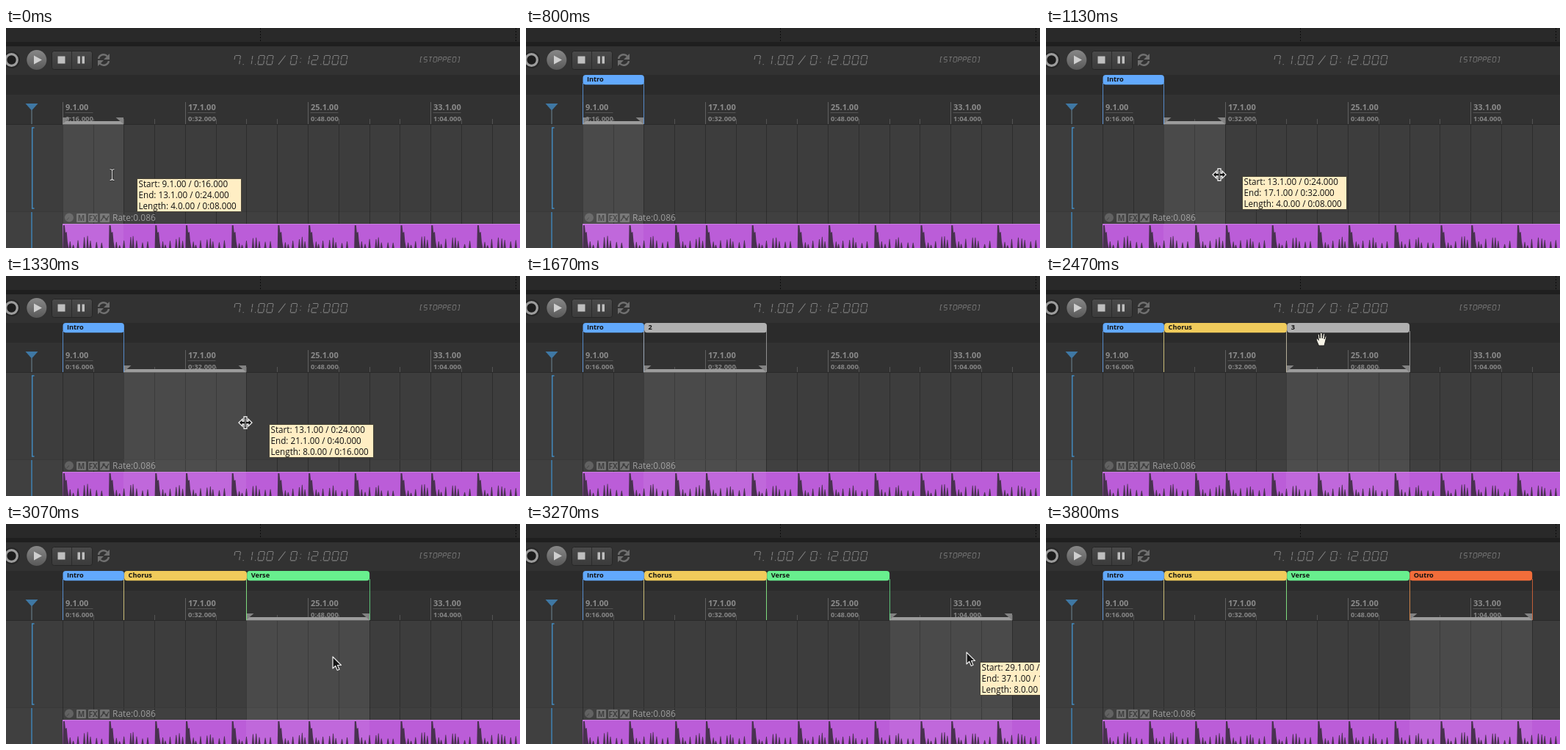
These frames come from a looping animation (700x300 px, 3870 ms). An HTML page:

```html
<!DOCTYPE html>
<html lang="en">
<head>
<meta charset="utf-8">
<title>Timeline regions</title>
<style>
  html, body { margin: 0; width: 100%; height: 100%; overflow: hidden; background: #3d3d3d; }
  svg { display: block; width: 700px; height: 300px; }
  text { font-family: "Open Sans", "Noto Sans", sans-serif; }
  .bar { font-size: 11px; font-weight: 700; fill: #8b8b8b; }
  .time { font-size: 9.5px; font-weight: 700; fill: #868686; }
  .name { font-size: 9.2px; font-weight: 700; fill: #111; }
  .tip { font-size: 11.7px; font-weight: 500; fill: #111; }
  .icon { font-size: 10px; font-weight: 700; fill: #3d3d3d; text-anchor: middle; }
</style>
</head>
<body>
<svg viewBox="0 0 700 300">
  <defs>
    <linearGradient id="knob" x2="0" y2="1">
      <stop stop-color="#888"/><stop offset="1" stop-color="#595959"/>
    </linearGradient>
    <linearGradient id="key" x2="0" y2="1">
      <stop stop-color="#4a4a4a"/><stop offset="1" stop-color="#3b3b3b"/>
    </linearGradient>
  </defs>
  <g id="base"></g>
  <g id="live"></g>
  <g id="front"></g>
</svg>
<script>
const LOOP = 3870;
const [base, live, front] = ['base', 'live', 'front'].map(id => document.getElementById(id));

const rect = (x, y, w, h, fill, more = '') =>
  `<rect x="${x}" y="${y}" width="${w}" height="${h}" fill="${fill}" ${more}/>`;
const path = (d, fill, more = '') => `<path d="${d}" fill="${fill}" ${more}/>`;
const line = (d, color, width = 1, more = '') =>
  path(d, 'none', `stroke="${color}" stroke-width="${width}" ${more}`);
const text = (x, y, cls, s) => `<text x="${x}" y="${y}" class="${cls}">${s}</text>`;

const barX = bar => 77.3 + (bar - 9) * 20.89;
const crisp = x => Math.floor(x) + 0.5;
const clock = s => `${Math.floor(s / 60)}:${String(s % 60).padStart(2, '0')}.000`;

// Slanted segment display: a top, b/c right, d bottom, e/f left, g middle
const SEGMENTS = {
  a: 'M1 0H8', b: 'M8.5 .6V5.9', c: 'M8.5 7.1V12.4', d: 'M1 13H8',
  e: 'M.5 7.1V12.4', f: 'M.5 .6V5.9', g: 'M1 6.5H8',
  t: 'M4.5 .6V12.4', s: 'M0 13L8 0', p: 'M2 12.2V13.4', q: 'M2 3.3V4.5M2 9V10.2',
  l: 'M7 0H4V13H7', r: 'M2 0H5V13H2'
};
const GLYPHS = {
  0: 'abcdef', 1: 'bc', 2: 'abged', 7: 'fabc', S: 'afgcd', T: 'at', O: 'abcdef', P: 'abefg',
  E: 'adefg', D: 'abcdef', '/': 's', '.': 'p', ':': 'q', '[': 'l', ']': 'r', ' ': ''
};
const ADVANCE = { '.': 5, ':': 5.4, ' ': 5.5, '/': 11 };

function segments(str, x, y, scale, color, width) {
  let pen = 0, out = '';
  for (const ch of str) {
    const d = [...GLYPHS[ch]].map(k => SEGMENTS[k]).join('');
    if (d) out += `<path transform="translate(${pen})skewX(-9)" d="${d}"/>`;
    pen += ADVANCE[ch] || 12.3;
  }
  return `<g role="img" aria-label="${str}" transform="translate(${x} ${y})scale(${scale})"
    fill="none" stroke="${color}" stroke-width="${width}">${out}</g>`;
}

function toolbar() {
  const arrows = 'M126 42A7 7 0 0 1 138 38.5M140 45A7 7 0 0 1 128 48.5';
  return rect(0, 0, 700, 20, '#292929') +
    line('M346.5 0V20M694.5 0V20', '#0d0d0d', 1, 'stroke-dasharray="2 2"') +
    rect(0, 19, 700, 6, '#1f1f1f') +
    rect(0, 25, 700, 39, '#323232') +
    '<circle cx="7.5" cy="43.5" r="11.5" fill="#262626"/>' +
    '<circle cx="7.5" cy="43.5" r="7.8" fill="#1c1c1c" stroke="#9c9c9c" stroke-width="3.2"/>' +
    '<circle cx="41.8" cy="43.5" r="13.5" fill="url(#knob)"/>' +
    path('M38 37.5L49 43.5L38 49.5Z', '#cfcfcf') +
    rect(62.5, 31.5, 55, 25, 'url(#key)', 'rx="3" stroke="#262626"') +
    line('M89.5 32V56', '#2b2b2b') +
    rect(70.5, 38.5, 10, 10, '#bfbfbf') +
    rect(97.5, 38.5, 3.5, 10, '#bfbfbf') + rect(103.5, 38.5, 3.5, 10, '#bfbfbf') +
    line(arrows, '#707070', 2.5) +
    path('M141 35V43H133ZM125 52V44H133Z', '#707070') +
    segments('7.1.00 / 0:12.000', 311.5, 37.5, 0.95, '#808080', 1.15) +
    segments('[STOPPED]', 563, 39.5, 0.53, '#787878', 1.8);
}

function ruler() {
  let out = rect(0, 64, 700, 27, '#2b2b2b') + rect(0, 91, 700, 41, '#323232') +
    rect(0, 131, 700, 1, '#2a2a2a') + rect(0, 132, 700, 168, '#3d3d3d') +
    rect(0, 251, 700, 49, '#404040');
  for (let bar = 9; bar < 39; bar += 2) {
    const x = crisp(barX(bar)), major = bar % 8 === 1;
    out += line(`M${x} 132V267`, '#2d2d2d') +
      line(`M${x} ${major ? 101 : 124}V131`, major ? '#606060' : '#545454');
    if (!major) continue;
    out += text(x + 3.5, 112.2, 'bar', `${bar}.1.00`) +
      line(`M${x + 3} 115.5h38`, '#555') +
      text(x + 3.5, 126.8, 'time', clock((bar - 1) * 2));
  }
  return out + line('M0 250.5H700', '#353535', 1, 'stroke-dasharray="1 1"');
}

function playhead() {
  return line('M35 112V131', '#6f8796') + line('M35 251V300', '#3f7eac', 1.6) +
    path('M26.5 103H43.5L35 112.5Z', '#3f78a4') +
    line('M38.5 136H35.7V246H38.5', '#4389bd', 1.5);
}

function waveform() {
  let seed = 7;
  const rnd = () => (seed = seed * 16807 % 2147483647) / 2147483647;
  const needle = (x, h) =>
    `M${x - 1.6} 300L${x - .4} ${300 - h}H${x + .4}L${x + 1.6} 300Z`;
  const tail = [[10, 8], [14, 5], [20, 11], [29, 14], [33, 17], [37, 10]];
  let wave = '';
  for (let beat = 0; beat < 12; beat++) {
    const x = barX(9 + 8 * Math.floor(beat / 3) + 3 * (beat % 3));
    wave += `M${x} 300L${x + .6} 269H${x + 2.6}L${x + 3.6} 279L${x + 5.4} 278L${x + 6.5} 291L${x + 8} 300Z`;
    for (const [dx, h] of tail) wave += needle(x + dx + rnd(), h * (.75 + rnd() * .4));
    if (beat % 3 < 2) wave += needle(x + 46, 5 + rnd() * 4) + needle(x + 53, 6 + rnd() * 5);
  }
  return path(wave, '#48324f');
}

function clip() {
  return rect(77, 267, 623, 33, '#bb5dd8') + rect(77, 267, 623, 1, '#cb7de3');
}

function clipHeader() {
  return '<circle cx="86" cy="258.5" r="6" fill="#626262"/>' +
    line('M86 258.5L82.500 262', '#505050', 1.2) +
    [96, 112, 128].map(x => rect(x, 253, 13, 12, '#717171', 'rx="1"')).join('') +
    text(102.5, 262.7, 'icon', 'M') + text(118.5, 262.7, 'icon', 'FX') +
    line('M129 263L133 257.5L137 261L140 256', '#3d3d3d', 1.3) +
    path('M131.5 255.5h3v3h-3zM135.5 259.5h3v3h-3z', '#3d3d3d') +
    '<text x="145" y="263" font-size="12" fill="#9c9c9c">Rate:0.086</text>';
}

const BEAM = 'M-3 -7.5Q0 -7.5 0 -5.5V5.5Q0 7.5 -3 7.5M3 -7.5Q0 -7.5 0 -5.5M0 5.5Q0 7.5 3 7.5';
const CURSORS = {
  beam: line(BEAM, '#222', 2.6) + line(BEAM, '#ddd', 1.1),
  size: path('M-9 0L-4 -5V-2H-2V-8H2V-2H4V-5L9 0L4 5V2H2V8H-2V2H-4V5Z', '#111',
    'stroke="#f2f2f2" stroke-width="1.3"') + line('M0 -6V6', '#eee', .8),
  arrow: path('M0 0V16L3.7 12.5L6.3 18.5L9 17.3L6.5 11.5H11.5Z', '#151515',
    'stroke="#e8e8e8" stroke-width="1.2" stroke-linejoin="round"'),
  hand: path('M-3.5 9L-6.5 2Q-7.5 -1 -5.5 -1L-3.8 1.5L-4.8 -6Q-4 -8 -2.7 -6L-1.8 -1L-1.5 -8Q0 -10 1 -8L1.2 -1L2.5 -7Q4 -8.5 4.5 -6.5L4 0L5.5 -4Q7 -5 7 -3L5 5L4 9Z',
    '#f6f3e6', 'stroke="#222" stroke-width="1" stroke-linejoin="round"')
};

// time, selection start and end bar, cursor, x, y, tooltip x, y
const STEPS = [
  [0, 9, 13, 'beam', 144.5, 200, 178, 205],
  [70, 9, 13, 'beam', 147, 203, 181, 209],
  [130, 9, 13, 'beam', 147, 196],
  [200, 9, 13, 'arrow', 150, 140],
  [270, 9, 13, 'hand', 152, 95],
  [330, 9, 13, 'hand', 153.5, 77.5],
  [530, 9, 13],
  [930, 9, 13, 'arrow', 163, 175],
  [1000, 13, 13, 'beam', 163, 200],
  [1070, 13, 15, 'size', 196, 200, 222, 202],
  [1130, 13, 17, 'size', 236, 200, 267, 202],
  [1200, 13, 19, 'size', 282, 200, 305, 202],
  [1270, 13, 21, 'size', 318, 200, 346, 202],
  [1330, 13, 21, 'size', 326, 200, 358, 202],
  [1400, 13, 21, 'size', 326, 200],
  [1470, 13, 21, 'arrow', 300, 140],
  [1530, 13, 21, 'hand', 262, 92],
  [1600, 13, 21, 'hand', 250, 76],
  [1670, 13, 21],
  [2070, 13, 21, 'arrow', 270, 182],
  [2130, 13, 21, 'arrow', 300, 180, 302, 188],
  [2200, 15, 23, 'arrow', 350, 178, 330, 188],
  [2270, 19, 27, 'arrow', 408, 180, 385, 188],
  [2330, 21, 29, 'arrow', 432, 180, 461, 188],
  [2400, 21, 29, 'arrow', 412, 130],
  [2470, 21, 29, 'hand', 375, 86],
  [2530, 21, 29, 'hand', 377.5, 75],
  [2670, 21, 29],
  [2930, 21, 29, 'arrow', 415, 150],
  [3000, 21, 29, 'arrow', 438, 176],
  [3070, 21, 29, 'arrow', 445, 181],
  [3130, 23, 31, 'arrow', 490, 181, 480, 188],
  [3200, 27, 35, 'arrow', 565, 180, 550, 188],
  [3270, 29, 37, 'arrow', 600, 175, 618, 188],
  [3330, 29, 37, 'hand', 585, 92],
  [3400, 29, 37, 'hand', 618, 78],
  [3470, 29, 37, 'hand', 650, 68],
  [3530, 29, 37, 'hand', 657, 65],
  [3670, 29, 37]
];

// time added, time named, start and end bar, name, colour
const REGIONS = [
  [270, 670, 9, 13, 'Intro', '#62a9fd'],
  [1530, 1930, 13, 21, 'Chorus', '#f0cb5b'],
  [2470, 2870, 21, 29, 'Verse', '#68ef8e'],
  [3330, 3800, 29, 37, 'Outro', '#f26d3a']
];

function selection(from, to) {
  if (from === to) return '';
  const a = Math.floor(barX(from)), b = Math.floor(barX(to));
  return rect(a, 132, b - a, 168, '#fff', 'opacity=".065"') +
    rect(a, 127, b - a, 4.5, '#9c9c9c') +
    path(`M${a} 122H${a + 10.5}L${a} 131ZM${b} 122H${b - 10.5}L${b} 131Z`, '#828282');
}

function region([added, named, from, to, name, fill], i, t) {
  if (t < added) return '';
  const done = t >= named, a = barX(from), b = barX(to), color = done ? fill : '#b0b0b0';
  return line(`M${crisp(a)} 75V131M${crisp(b)} 75V131`, color, 1, 'opacity=".75"') +
    rect(a + .2, 64, b - a - .2, 13.2, color, 'rx="4"') +
    text(a + 5.7, 73.4, 'name', done ? name : i + 1);
}

function tooltip(x, y, from, to) {
  const n = to - from;
  const rows = [
    `Start: ${from}.1.00 / ${clock((from - 1) * 2)}`,
    `End: ${to}.1.00 / ${clock((to - 1) * 2)}`,
    `Length: ${n}.0.00 / ${clock(n * 2)}`
  ];
  return rect(x + .5, y + .5, 142, 45, '#ffeec4', 'stroke="#4a4538"') +
    rows.map((s, i) => text(x + 2.5, y + 11.7 + 15 * i, 'tip', s)).join('');
}

function render(t) {
  const [, from, to, cursor, x, y, tipX, tipY] = STEPS.findLast(s => s[0] <= t);
  let out = selection(from, to) + REGIONS.map((r, i) => region(r, i, t)).join('');
  if (tipX) out += tooltip(tipX, tipY, from, to);
  if (cursor) out += `<g transform="translate(${x} ${y})">${CURSORS[cursor]}</g>`;
  return out;
}

base.innerHTML = toolbar() + ruler() + clip() + clipHeader() + playhead();
front.innerHTML = waveform();

const start = performance.now();
let shown = '';
function tick() {
  const next = render((performance.now() - start) % LOOP);
  if (next !== shown) live.innerHTML = shown = next;
  requestAnimationFrame(tick);
}
tick();
</script>
</body>
</html>
```
